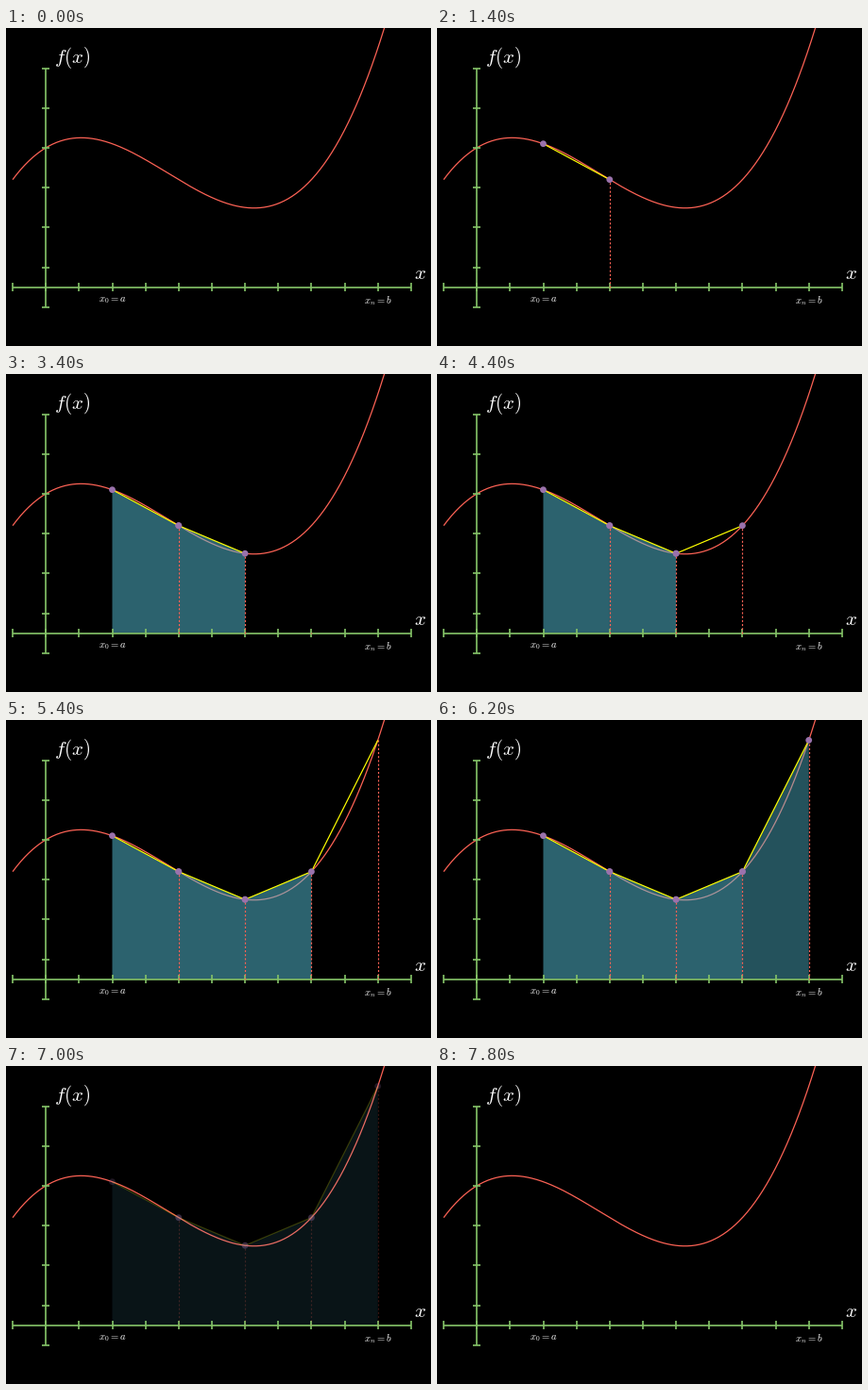
A matplotlib script for the animation above (8 s loop, 450 by 337 pixels).

```python
import numpy as np
import matplotlib.pyplot as plt
from matplotlib.animation import FuncAnimation

W, H, DPI = 450, 337, 72
STEP, FRAMES = 200, 40
X0, UX = 42.2, 35.15
Y0, UY = 274.6, 42.2
GREEN, RED, YELLOW = "#83C167", "#FC6255", "#FFFF00"
BLUE, PURPLE = "#58C4DD", "#9A72AC"

# Milliseconds: each segment has a line, a dot and an area stage.
START, STAGE, FADE = 370, 500, 1000
NODES = [2, 4, 6, 8, 10]
FADE_START = START + 3 * STAGE * (len(NODES) - 1)

plt.rcParams["mathtext.fontset"] = "cm"
plt.rcParams["toolbar"] = "None"


def f(x):
    return 0.025 * x**3 - 0.275 * x**2 + 0.5 * x + 3.5


def px(x):
    return X0 + UX * x


def py(y):
    return Y0 - UY * y


def smooth(t):
    if t <= 0:
        return 0.0
    if t >= 1:
        return 1.0
    edge = 1 / (1 + np.exp(5))
    return float((1 / (1 + np.exp(-10 * (t - 0.5))) - edge) / (1 - 2 * edge))


fig = plt.figure(figsize=(W / DPI, H / DPI), dpi=DPI, facecolor="black")
ax = fig.add_axes([0, 0, 1, 1])
ax.set_xlim(0, W)
ax.set_ylim(H, 0)
ax.axis("off")


def stroke(xs, ys, color, width, z, **kw):
    kw.setdefault("solid_capstyle", "butt")
    return ax.plot(xs, ys, color=color, lw=width, zorder=z, **kw)[0]


def label(x, y, text, size):
    ax.text(x, y, text, color="white", size=size, ha="center", va="baseline", zorder=9)


def draw_axes():
    tick = 4.2
    stroke([px(-1), px(11)], [Y0, Y0], GREEN, 1.7, 4)
    stroke([X0, X0], [py(-0.5), py(5.5)], GREEN, 1.7, 4)
    for x in range(-1, 12):
        stroke([px(x)] * 2, [Y0 - tick, Y0 + tick], GREEN, 1.7, 4)
    for y in np.arange(-0.5, 6):
        stroke([X0 - tick, X0 + tick], [py(y)] * 2, GREEN, 1.7, 4)


class Segment:
    def __init__(self, index):
        self.a, self.b = NODES[index], NODES[index + 1]
        self.start = START + 3 * STAGE * index
        a, b = self.a, self.b
        corners = [(px(a), Y0), (px(a), py(f(a))), (px(b), py(f(b))), (px(b), Y0)]
        self.area = plt.Polygon(corners, fc=BLUE, ec="none", lw=0, zorder=3)
        ax.add_patch(self.area)
        self.dash = stroke([], [], RED, 1.2, 5, ls=(0, (1.75, 1.75)), dash_capstyle="butt")
        self.chord = stroke([], [], YELLOW, 1.2, 6)
        self.dots = [plt.Circle((px(x), py(f(x))), 3.4, fc=PURPLE, ec="none", zorder=7)
                     for x in (a, b)]
        for dot in self.dots:
            ax.add_patch(dot)

    def update(self, t, keep):
        grow, dot, fill = (smooth((t - self.start) / STAGE - k) for k in range(3))
        a, b = self.a, self.b
        x = a + (b - a) * grow
        y = f(a) + (f(b) - f(a)) * grow
        self.chord.set_data([px(a), px(x)], [py(f(a)), py(y)])
        self.dash.set_data([px(b)] * 2, [Y0, py(f(b) * grow)])
        shown = keep if grow > 0 else 0
        self.chord.set_alpha(shown)
        self.dash.set_alpha(shown)
        self.area.set_alpha(0.5 * fill * keep)
        for d in self.dots:
            d.set_alpha(dot * keep)
        return [self.area, self.dash, self.chord, *self.dots]


draw_axes()
xs = np.linspace(-1, 11, 400)
stroke(px(xs), py(f(xs)), RED, 1.25, 2)
label(70.5, 37.2, "$f(x)$", 21)
label(438.2, 266.3, "$x$", 21)
label(112.7, 290, "$x_0=a$", 10.6)
label(394, 292.5, "$x_n=b$", 10.6)
segments = [Segment(i) for i in range(len(NODES) - 1)]


def draw(frame):
    t = frame * STEP
    keep = 1 - smooth((t - FADE_START) / FADE)
    return [artist for s in segments for artist in s.update(t, keep)]


anim = FuncAnimation(fig, draw, frames=FRAMES, interval=STEP, init_func=lambda: draw(0),
                     repeat=True, repeat_delay=0, blit=False)
plt.show()
```
